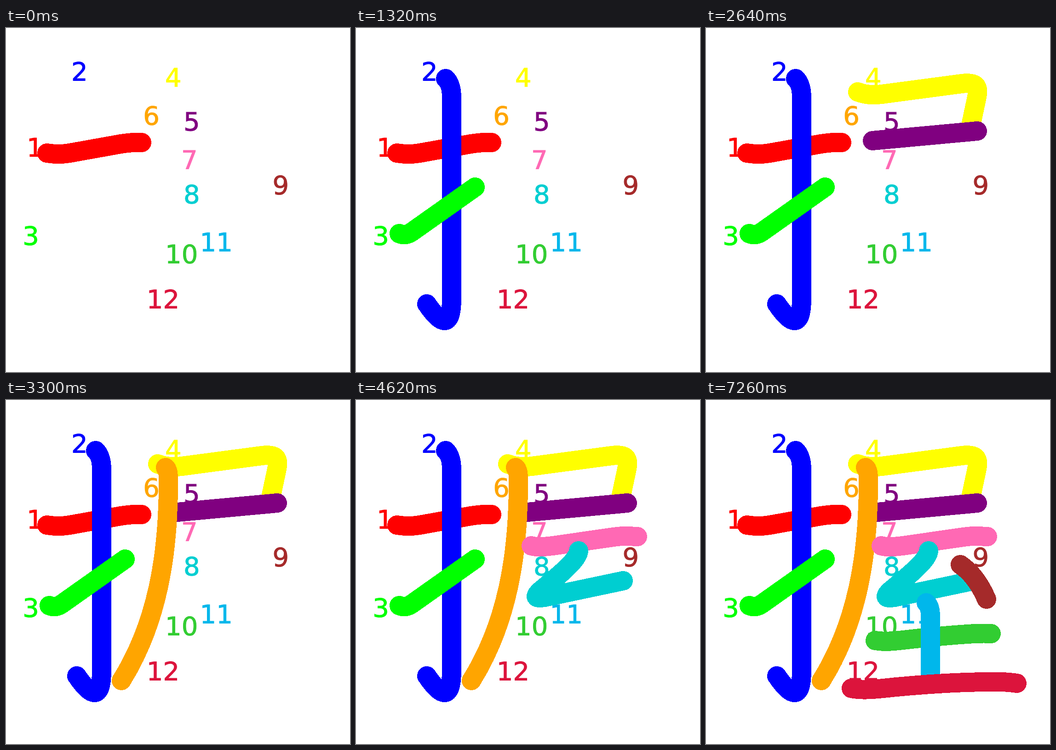
These frames come from a looping animation (748x748 px, 7920 ms). An HTML page:

```html
<!DOCTYPE html>
<html lang="en">
<head>
<meta charset="utf-8">
<title>Stroke order</title>
<style>
html, body { margin: 0; height: 100%; overflow: hidden; background: #fff; }
svg { display: block; width: 100%; height: 100%; }
text { font: 56px Verdana, "DejaVu Sans", sans-serif; stroke-width: 1; }
path { fill: none; stroke-width: 42; stroke-linecap: round; stroke-linejoin: round; shape-rendering: crispEdges; }
</style>
</head>
<body>
<svg viewBox="0 0 748 748"><g id="labels"></g><g id="strokes"></g></svg>
<script>
const STEP = 660;

// colour, label x, label baseline, stroke path
const parts = [
  ['red', 45, 278.5, 'M89 272C110 275 122 275 144 271L250 252C270 249 280 248 295 249'],
  ['blue', 142, 114, 'M195 110Q208 122 208 152V588C208 650 188 650 154 600'],
  ['lime', 36.3, 470.5, 'M94 447Q108 453 122 443L259 346'],
  ['yellow', 346, 127, 'M330 139C350 147 370 146 390 143L556 121C586 117 594 125 589 150L575 216'],
  ['purple', 386, 223, 'M362 245L590 224'],
  ['orange', 298.3, 210, 'M347 147Q354 152 353 180C353 340 328 487 251 610'],
  ['hotpink', 381, 305.5, 'M381 317C395 321 410 319 428 317L560 298C580 295 590 296 612 297'],
  ['darkturquoise', 386, 380.5, 'M484 328C484 348 430 390 410 407C386 426 386 433 410 429L581 393'],
  ['brown', 579.4, 361, 'M553 358Q588 382 610 433'],
  ['limegreen', 346, 511, 'M368 523C385 526 400 525 420 523C480 516 550 510 585 508Q605 507 620 508'],
  ['#00b7eb', 421.6, 485, 'M479 441Q488 449 488 470V612'],
  ['crimson', 305.8, 608.5, 'M316 627C335 631 355 630 375 628C450 620 540 613.5 615 613Q650 612 676 616']
];

function add(parent, tag, attrs) {
  const el = document.createElementNS('http://www.w3.org/2000/svg', tag);
  for (const key in attrs) el.setAttribute(key, attrs[key]);
  return document.getElementById(parent).appendChild(el);
}

const strokes = parts.map(([color, x, y, d], i) => {
  add('labels', 'text', { x, y, fill: color, stroke: color }).textContent = i + 1;
  return add('strokes', 'path', { d, stroke: color });
});

const start = performance.now();
function draw(now) {
  const current = Math.floor(Math.max(0, now - start) / STEP) % parts.length;
  strokes.forEach((el, i) => { el.style.display = i <= current ? '' : 'none'; });
  requestAnimationFrame(draw);
}
draw(start);
</script>
</body>
</html>
```
